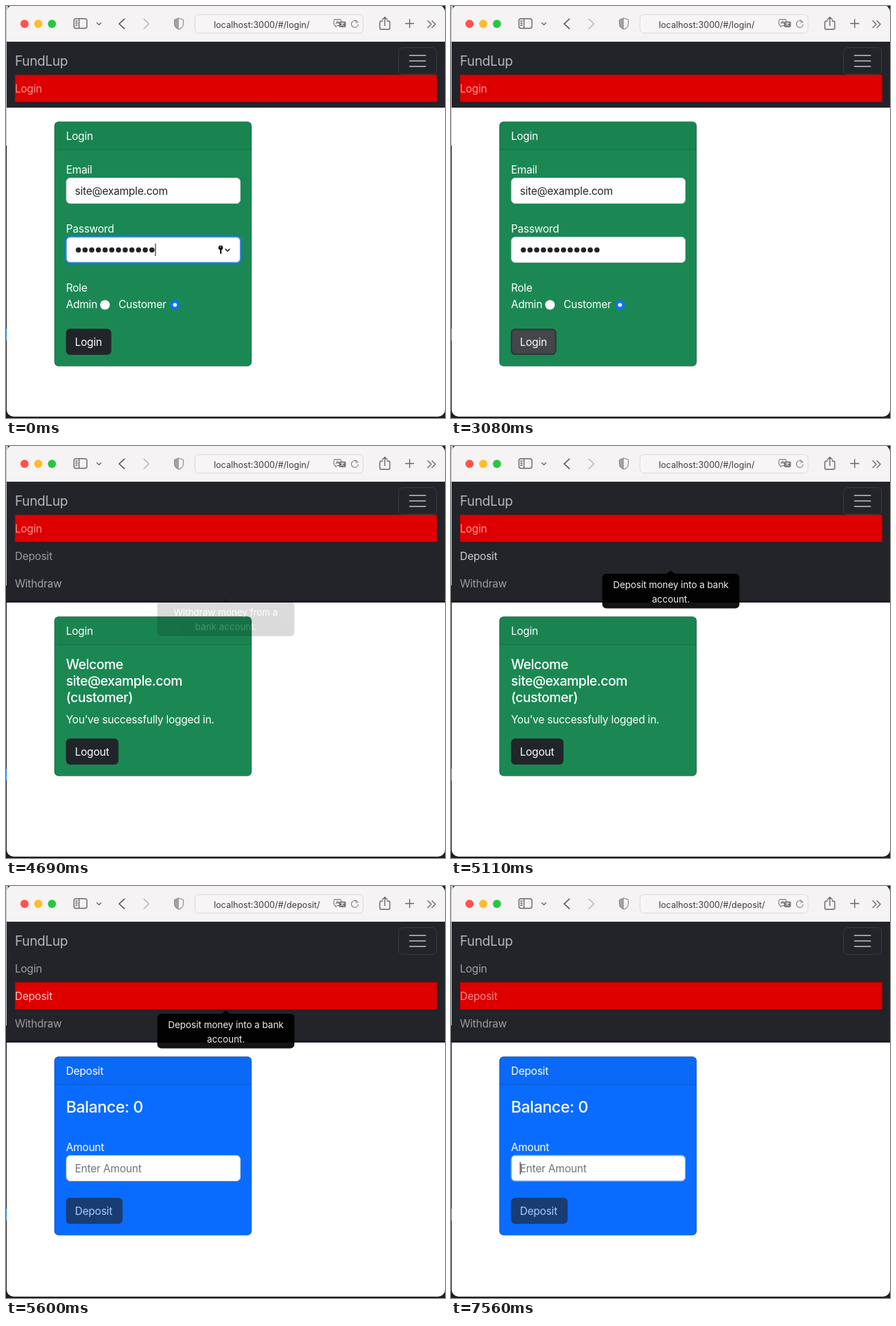
Write an HTML page that moves like this. It is 640x600 px and loops after 8000 ms.

```html
<!DOCTYPE html>
<html lang="en">
<head>
<meta charset="utf-8">
<title>Login and deposit</title>
<style>
  html, body { margin: 0; height: 100%; overflow: hidden; background: #fff; }
  svg { display: block; width: 100vw; height: 100vh; }
  text { font: 15.5px Inter, "Noto Sans", sans-serif; letter-spacing: -.014em; fill: #fff; white-space: pre; }
  .brand { font-size: 19.4px; letter-spacing: -.022em; fill: #b4b5b6; }
  .h4 { font-size: 23.25px; font-weight: 500; letter-spacing: -.02em; }
  .h5 { font-size: 19.4px; font-weight: 500; letter-spacing: -.022em; }
  .tip { font-size: 13.6px; letter-spacing: -.007em; text-anchor: middle; }
  .url { font-size: 12.6px; letter-spacing: 0; fill: #3c3c3c; }
  .field { fill: #212529; }
  .hint { fill: #6c757d; }
  .icon { fill: none; stroke: #666; stroke-width: 1.4; stroke-linecap: round; stroke-linejoin: round; }
</style>
</head>
<body>
<svg id="stage" viewBox="0 0 640 600"></svg>
<script>
const LOOP = 8000;
const EMAIL = "site@example.com";

const text = (x, y, str, cls = "", attrs = "") =>
  `<text x="${x}" y="${y}" class="${cls}" ${attrs}>${str}</text>`;
const rect = (x, y, w, h, r, fill, attrs = "") =>
  `<rect x="${x}" y="${y}" width="${w}" height="${h}" rx="${r}" fill="${fill}" ${attrs}/>`;
const circle = (x, y, r, fill, attrs = "") =>
  `<circle cx="${x}" cy="${y}" r="${r}" fill="${fill}" ${attrs}/>`;
const icon = (d, attrs = "") => `<path class="icon" d="${d}" ${attrs}/>`;
const group = (id, body, attrs = "") => `<g id="${id}" ${attrs}>${body}</g>`;

const card = (y, h, fill, title) =>
  rect(70.5, y + .5, 287.5, h - 1, 6, fill) +
  `<path d="M71 ${y + 41}V${y + 7}q0-6 6-6H352q6 0 6 6V${y + 41}Z" fill="#000" fill-opacity=".03"/>` +
  rect(71, y + 40.5, 287, 1, 0, "#000", 'fill-opacity=".2"') +
  rect(71, y + .5, 287, h - 1, 6, "none", 'stroke="#000" stroke-opacity=".25"') +
  text(87.5, y + 27, title);

const input = y => rect(88, y + .5, 253.5, 37, 5.5, "#fff", 'stroke="#ced4da"');

const focusRing = (id, y, stroke) => group(id,
  rect(86, y - 1.5, 257.5, 41, 7.5, "none", 'stroke="#0d6efd" stroke-opacity=".28" stroke-width="4"') +
  rect(88, y + .5, 253.5, 37, 5.5, "none", `stroke="${stroke}" stroke-width="1.3"`));

const button = (y, w, label, id = "") =>
  rect(87.5, y, w, 38, 6, "#212529", id && `id="${id}"`) + text(100.5, y + 25, label);

const tooltip = (id, y, lines) => group(id,
  `<path d="M314 ${y + .5}L320.5 ${y - 4.5}L327 ${y + .5}Z"/>` +
  rect(220.5, y, 200, 50.5, 6, "#000") +
  lines.map((line, i) => text(320.5, y + 20.5 + i * 21, line, "tip")).join(""));

const toolbar =
  rect(1, 0, 639, 52, 0, "#f5f3f3") +
  ["#fe544d", "#febc2e", "#27c840"].map((c, i) => circle(27 + 20 * i, 26, 6, c)).join("") +
  icon("M102 18.5h13q3 0 3 3v8q0 3-3 3h-13q-3 0-3-3v-8q0-3 3-3ZM106.5 18.5v14M101.5 22h2.5M101.5 25h2.5M101.5 28h2.5") +
  icon("M132.500 24.500l3 3l3-3") +
  icon("M172.500 19l-7.500 7l7.500 7", 'style="stroke:#4e4e4e;stroke-width:1.7"') +
  icon("M201 19l7.500 7l-7.500 7", 'style="stroke:#b9b7b7;stroke-width:1.7"') +
  `<path d="M252 17.500L245.500 20v6q0 5.500 6.500 8Z" fill="#a3a1a1"/>` +
  icon("M252 17.500L258.500 20v6q0 5.500-6.500 8q-6.500-2.500-6.500-8v-6Z", 'style="stroke:#929090;stroke-width:1.200"') +
  rect(275.5, 12.5, 245, 27, 6, "#f7f5f5", 'stroke="#dad8d8"') +
  `<text id="url" class="url" x="303" y="31.500"></text>` +
  icon("M480 19.500h7q2 0 2 2v5q0 2-2 2h-4l-2.500 2v-2q-2.500 0-2.500-2v-5q0-2 2-2ZM481 26l2.500-4.500l2.500 4.500M482 24.500h3", 'style="stroke-width:1"') +
  rect(485.5, 22.5, 10, 8.5, 2, "#747272") +
  icon("M488 25h5M490.500 24v1M492 25q-1 3-4 4M489 26q1 2 3.500 3", 'style="stroke:#fff;stroke-width:.8"') +
  icon("M513 24a5 5 0 1 0 .5 3M509 20.500l2.500 1.500l-1.500 2.500", 'style="stroke:#858383;stroke-width:1.200"') +
  icon("M549 22h-2q-2 0-2 2v8q0 2 2 2h10.500q2 0 2-2v-8q0-2-2-2h-2M552.300 28.500V16.500M548.800 19.800l3.500-3.500l3.500 3.500") +
  icon("M588.500 19.500v12M582.500 25.500h12") +
  icon("M615 21.500l5 5l-5 5M621 21.500l5 5l-5 5");

const navbar =
  rect(1, 52, 639, 96, 0, "#222429", 'id="navBack"') +
  group("navEdge", rect(1, 225, 639, 3, 0, "#1f1926")) +
  text(13, 87, "FundLup", "brand") +
  rect(572.5, 60.5, 55, 39, 6, "none", 'stroke="#fff" stroke-opacity=".11"') +
  icon("M588.500 72h23M588.500 80h23M588.500 88h23", 'style="stroke:#9c9da0;stroke-width:1.800"') +
  group("active", rect(13, 100, 615.5, 40, 0, "#de0000") +
    rect(13.5, 100.5, 614.5, 39, 0, "none", 'stroke="#b80000"')) +
  text(13, 126, "Login", "", 'fill-opacity=".6" style="fill-opacity:.58"') +
  text(13, 166, "Deposit", "", 'id="linkDeposit"') +
  text(13, 206, "Withdraw", "", 'id="linkWithdraw"');

const dots = Array.from({ length: 12 }, (_, i) => circle(105.5 + i * 9.75, 355.3, 3.8, "#212529")).join("");

const loginPage =
  card(168, 357, "#1b8854", "Login") +
  text(87.5, 244, "Email") + input(250) + text(100.5, 275, EMAIL, "field") +
  text(87.5, 330, "Password") + input(336) + focusRing("passwordFocus", 336, "#4b92ea") + dots +
  rect(217.3, 346, 1.2, 18, 0, "#333", 'id="passwordCaret"') +
  group("keyIcon",
    circle(313, 352, 3.3, "#111") + rect(312, 354, 2.2, 7, 1, "#111") + circle(313, 351, .8, "#fff") +
    icon("M320 354l3 3l3-3", 'style="stroke:#111;stroke-width:1.500"')) +
  text(87.5, 416, "Role") + text(87.5, 440, "Admin") + text(164, 440, "Customer") +
  circle(144.3, 435.2, 7, "#fff") + circle(246.3, 435.2, 7, "#0b74fb") + circle(246.3, 435.2, 2.8, "#fff") +
  button(470, 66, "Login", "loginButton") +
  group("pressed", rect(88.3, 470.8, 64.4, 36.4, 5.5, "none", 'stroke="#2b3034" stroke-width="1.600"'));

const welcomePage =
  card(248, 233, "#1b8854", "Login") +
  ["Welcome", EMAIL, "(customer)"].map((s, i) => text(87.5, 325 + 24 * i, s, "h5")).join("") +
  text(87.5, 404, "You've successfully logged in.") +
  button(426, 76.5, "Logout");

const depositPage =
  card(248, 261, "#0a6cfe", "Deposit") +
  text(87.5, 330, "Balance: 0", "h4") +
  text(87.5, 386, "Amount") + input(392) + focusRing("amountFocus", 392, "#86b7fe") +
  text(100.5, 417, "Enter Amount", "hint") +
  rect(100.4, 402, 1.2, 18, 0, "#333", 'id="amountCaret"') +
  group("depositButton", button(454, 82.5, "Deposit"), 'opacity=".65"');

document.getElementById("stage").innerHTML =
  rect(0, 0, 640, 600, 0, "#1d1d24") +
  rect(0, 0, 3, 203, 0, "#c9c9cb") + rect(0, 470, 2, 17, 0, "#1686f0") +
  `<clipPath id="window"><rect x="1" y="-1" width="639" height="599" rx="10"/></clipPath>` +
  `<g clip-path="url(#window)">` +
  rect(1, 0, 639, 598, 0, "#fff") + toolbar + navbar +
  group("loginPage", loginPage) + group("welcomePage", welcomePage) + group("depositPage", depositPage) +
  tooltip("tipDeposit", 186, ["Deposit money into a bank", "account."]) +
  tooltip("tipWithdraw", 226.5, ["Withdraw money from a", "bank account."]) + "</g>";

const el = Object.fromEntries([...document.querySelectorAll("[id]")].map(n => [n.id, n]));
const ramp = (t, from, length = 150) => Math.min(1, Math.max(0, (t - from) / length));
const pulse = (t, on, off) => ramp(t, on) - ramp(t, off);
const mix = (a, b, k) => `rgb(${a.map((v, i) => Math.round(v + (b[i] - v) * k))})`;
const show = (node, visible) => node.setAttribute("display", visible ? "inline" : "none");
const fade = (node, opacity) => node.setAttribute("opacity", opacity);

function draw(t) {
  const loggedIn = t >= 3640, depositing = t >= 5460;
  show(el.loginPage, !loggedIn);
  show(el.welcomePage, loggedIn && !depositing);
  show(el.depositPage, depositing);

  el.url.textContent = `localhost:3000/#/${depositing ? "deposit" : "login"}/`;
  el.navBack.setAttribute("height", loggedIn ? 176 : 96);
  show(el.navEdge, loggedIn);
  show(el.linkDeposit, loggedIn);
  show(el.linkWithdraw, loggedIn);
  el.active.setAttribute("transform", `translate(0 ${depositing ? 40 : 0})`);

  show(el.passwordCaret, t < 420);
  show(el.keyIcon, t < 700);
  fade(el.passwordFocus, 1 - ramp(t, 690));
  fade(el.pressed, ramp(t, 690));
  el.loginButton.setAttribute("fill", mix([33, 37, 41], [68, 70, 74], ramp(t, 405)));

  const onWithdraw = pulse(t, 4668, 4845), onDeposit = pulse(t, 4955, 5930);
  fade(el.tipWithdraw, .92 * onWithdraw);
  fade(el.tipDeposit, .92 * onDeposit);
  el.linkWithdraw.style.fillOpacity = .55 + .2 * onWithdraw;
  el.linkDeposit.style.fillOpacity = .55 + .23 * onDeposit;

  fade(el.amountFocus, ramp(t, 6470, 110));
  show(el.amountCaret, (t >= 6510 && t < 7000) || t >= 7560);
}

const start = performance.now();
function tick() {
  draw((performance.now() - start) % LOOP);
  requestAnimationFrame(tick);
}
draw(0);
requestAnimationFrame(tick);
</script>
</body>
</html>
```
